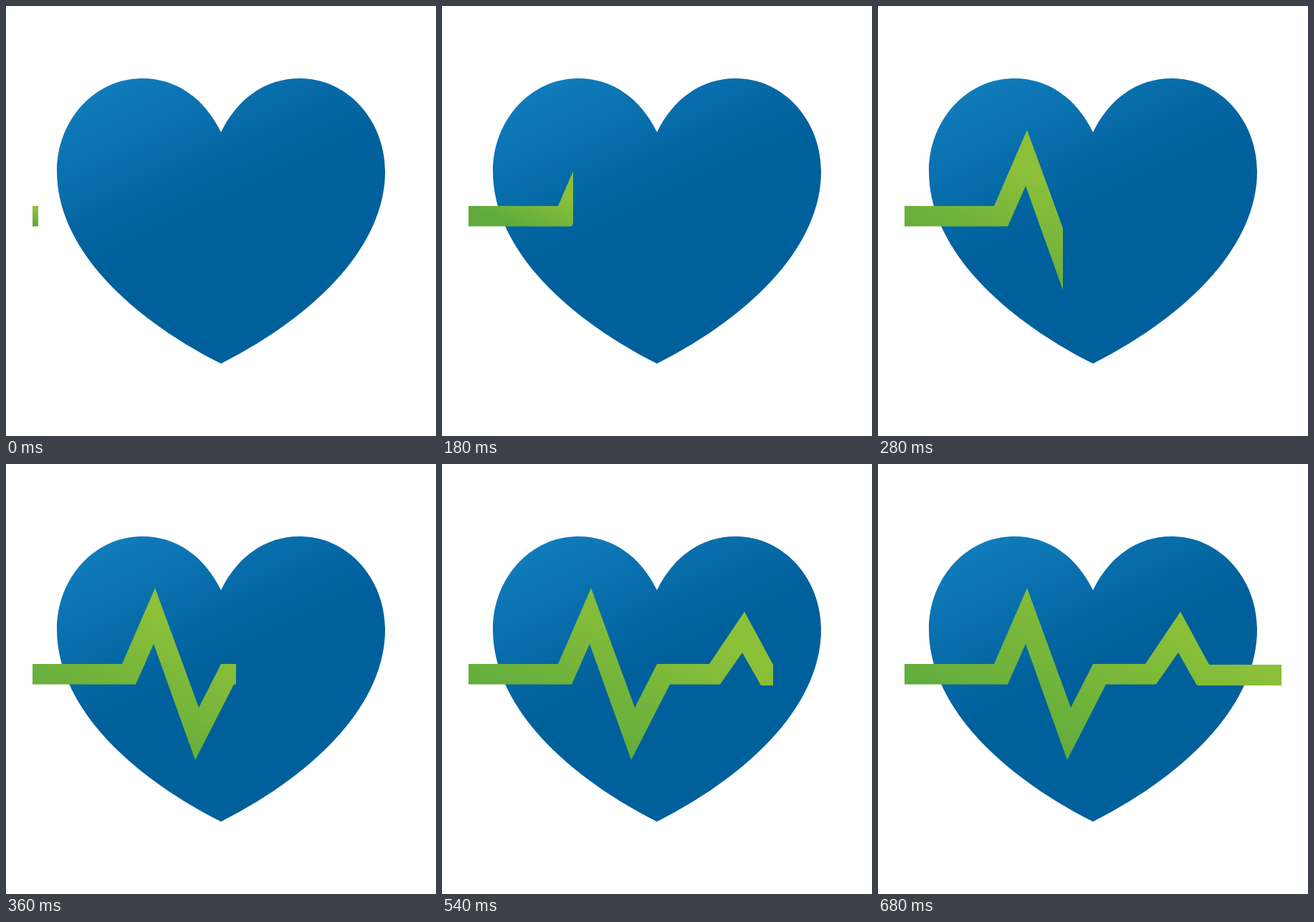
Animation of 600 by 600 pixels, one loop 700 ms. Source, as an HTML page with a canvas:

```html
<!DOCTYPE html>
<html>
<head>
<meta charset="utf-8">
<title>Heartbeat</title>
<style>
  html, body { margin: 0; width: 100%; height: 100%; overflow: hidden; background: #fff; }
  canvas { display: block; }
</style>
</head>
<body>
<canvas id="stage" width="600" height="600"></canvas>
<script>
const ctx = document.getElementById('stage').getContext('2d');
const LOOP = 700, STEP = 20;

const heart = new Path2D(
  'M300 176C277 129 238 101 190 101C124 101 71 159 71 231C71 330 160 428 300 499' +
  'C440 428 529 330 529 231C529 159 476 101 410 101C362 101 323 129 300 176Z');

const pulse = [
  [37, 279], [162, 279], [208, 173], [269, 340], [300, 279], [373, 279],
  [422, 206], [462, 280], [563, 280], [563, 309], [445, 309], [419, 263],
  [388, 307.5], [318, 307.5], [264, 413], [206, 251], [181, 307.5], [37, 307.5]
];

// [time, right edge of the revealed pulse]
const reveal = [[0, 45], [60, 93], [180, 183], [280, 258], [440, 384], [540, 462], [680, 563]];

function edgeAt(t) {
  const i = Math.max(1, reveal.findIndex(([time]) => time >= t));
  const [t0, x0] = reveal[i - 1], [t1, x1] = reveal[i];
  return Math.round(x0 + (x1 - x0) * (t - t0) / (t1 - t0));
}

// Keep the part of the polygon left of the edge
function clipLeft(points, edge) {
  const out = [];
  points.forEach(([x, y], i) => {
    const [nx, ny] = points[(i + 1) % points.length];
    if (x <= edge) out.push([x, y]);
    if ((x <= edge) !== (nx <= edge)) out.push([edge, y + (ny - y) * (edge - x) / (nx - x)]);
  });
  return out;
}

function gradient(x0, y0, x1, y1, from, to) {
  const g = ctx.createLinearGradient(x0, y0, x1, y1);
  g.addColorStop(0, from);
  g.addColorStop(1, to);
  return g;
}

// Gradient rising to the upper right, fitted to the bounds of the shape
function pulseFill(points) {
  const xs = points.map(p => p[0]), ys = points.map(p => p[1]);
  const left = Math.min(...xs), right = Math.max(...xs);
  const top = Math.min(...ys), bottom = Math.max(...ys);
  const cx = (left + right) / 2, cy = (top + bottom) / 2;
  const dx = 0.44, dy = -0.9;
  const half = ((right - left) * dx - (bottom - top) * dy) / 2;
  const a = -0.6 * half, b = 0.5 * half;
  return gradient(cx + a * dx, cy + a * dy, cx + b * dx, cy + b * dy, '#5fab3d', '#8cc038');
}

const heartFill = gradient(72, 148, 164, 337, '#107bbb', '#00609b');

function draw(now) {
  const t = Math.floor(now % LOOP / STEP) * STEP;
  ctx.fillStyle = '#fff';
  ctx.fillRect(0, 0, 600, 600);
  ctx.fillStyle = heartFill;
  ctx.fill(heart);

  const shape = clipLeft(pulse, edgeAt(t));
  ctx.fillStyle = pulseFill(shape);
  ctx.beginPath();
  shape.forEach(([x, y]) => ctx.lineTo(x, y));
  ctx.fill();
}

const start = performance.now();
function tick() {
  draw(performance.now() - start);
  requestAnimationFrame(tick);
}
tick();
</script>
</body>
</html>
```
